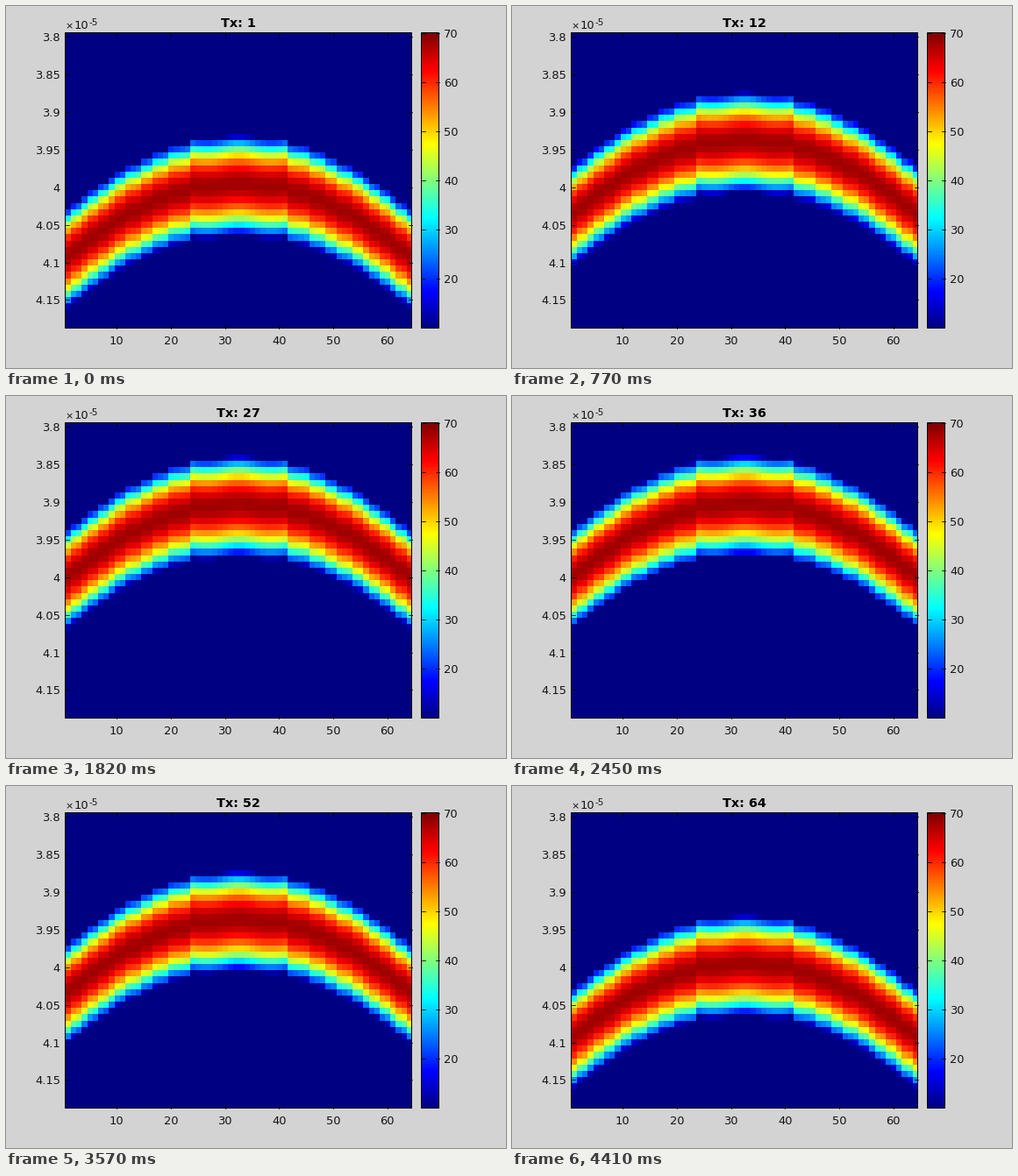
These frames come from a looping animation (570 px wide and 413 px high, 4.48 s). A matplotlib script:

```python
import numpy as np
import matplotlib.pyplot as plt
from matplotlib.animation import FuncAnimation
from matplotlib.colors import ListedColormap
from matplotlib.patches import Rectangle

W, H, DPI = 570, 413, 100
PX = 72 / DPI
N, ROWS = 64, 47
LEFT, RIGHT, TOP, BOTTOM = 67.5, 462.5, 31.1, 367.7
BOX = (67.5, 30.5, 462.5, 367.5)
BAR = (473.5, 30.5, 493.5, 367.5)
INK = "#141414"

plt.rcParams["font.family"] = "DejaVu Sans"


def jet(n=256):
    """Piecewise linear jet with n levels."""
    k = (np.arange(n) + 1) / n
    ramp = lambda c: np.clip(1.5 - np.abs(4 * k - c), 0, 1)
    return ListedColormap(np.column_stack([ramp(3), ramp(2), ramp(1)]))


def delay(index):
    """Arrival delay in rows for elements 1..64: a stepped parabola."""
    x = np.abs(np.asarray(index) - 32.5)
    phase = x**2 / 85
    crest = 0.7 * (1 - np.exp(-((x / 4) ** 2))) - 0.4 * (x / 9) ** 4
    steps = 0.6 * (np.floor(phase) + 0.5) + 0.4 * phase
    return np.where(phase < 1, crest, steps)


def echo(tx):
    """Received level in dB, rows by receivers; the onset is steeper."""
    centre = 11.8 + delay(tx) + delay(np.arange(1, N + 1))
    u = np.arange(ROWS)[:, None] - centre[None, :]
    return 68 - np.where(u < 0, 0.98, 0.84) * u**2


fig = plt.figure(figsize=(W / DPI, H / DPI), dpi=DPI, facecolor="#d3d3d3")
ax = fig.add_axes([0, 0, 1, 1])
cmap = jet()


def label(x, y, s, size=13, **kw):
    return ax.text(x, y, s, fontsize=size * PX, color=INK, va="baseline", **kw)


def line(x0, y0, x1, y1):
    ax.plot([x0, x1], [y0, y1], color="black", lw=0.8 * PX, zorder=3)


def frame(x0, y0, x1, y1):
    shape = (x0, y0), x1 - x0, y1 - y0
    ax.add_patch(Rectangle(*shape, fc=cmap(0), ec="none", zorder=-1))
    ax.add_patch(Rectangle(*shape, fill=False, ec="black", lw=PX,
                           snap=False, zorder=4))


def picture(data, x0, y0, x1, y1):
    return ax.imshow(data, cmap=cmap, vmin=10, vmax=70, aspect="auto",
                     interpolation="nearest", extent=(x0, x1, y1, y0))


image = picture(echo(1), LEFT, TOP, RIGHT, BOTTOM)
picture(np.linspace(70, 10, 256)[:, None], 474, 31, 493, 367)
frame(*BOX)
frame(*BAR)

col_w, row_h = (RIGHT - LEFT) / N, (BOTTOM - TOP) / ROWS
for v in range(10, 70, 10):
    x = LEFT + (v - 0.5) * col_w
    line(x, BOX[3], x, BOX[3] - 4)
    line(x, BOX[1], x, BOX[1] + 4)
    label(x, 386.3, str(v), ha="center")
for i in range(8):
    y = TOP + (6 * i + 0.5) * row_h
    line(LEFT, y, LEFT + 4, y)
    line(RIGHT, y, RIGHT - 4, y)
    label(62, y + 5, f"{3.8 + 0.05 * i:.3g}", ha="right")
for v in range(20, 80, 10):
    y = BAR[3] - (v - 10) / 60 * (BAR[3] - BAR[1])
    line(BAR[2], y, BAR[2] - 4, y)
    line(BAR[0], y, BAR[0] + 4, y)
    label(499, y + 5, str(v), ha="left")

label(67.5, 26.5, "×", size=11, ha="left")
label(78, 26.5, "10", ha="left")
label(94.5, 22.5, "-5", size=10.4, ha="left")
title = label(265, 24, "Tx: 1", size=14.4, ha="center", weight="bold")
title.set_color("black")

ax.set_xlim(0, W)
ax.set_ylim(H, 0)
ax.axis("off")


def update(i):
    image.set_data(echo(i + 1))
    title.set_text(f"Tx: {i + 1}")
    return image, title


anim = FuncAnimation(fig, update, frames=N, interval=70, repeat=True,
                     repeat_delay=0, blit=False)
plt.show()
```
